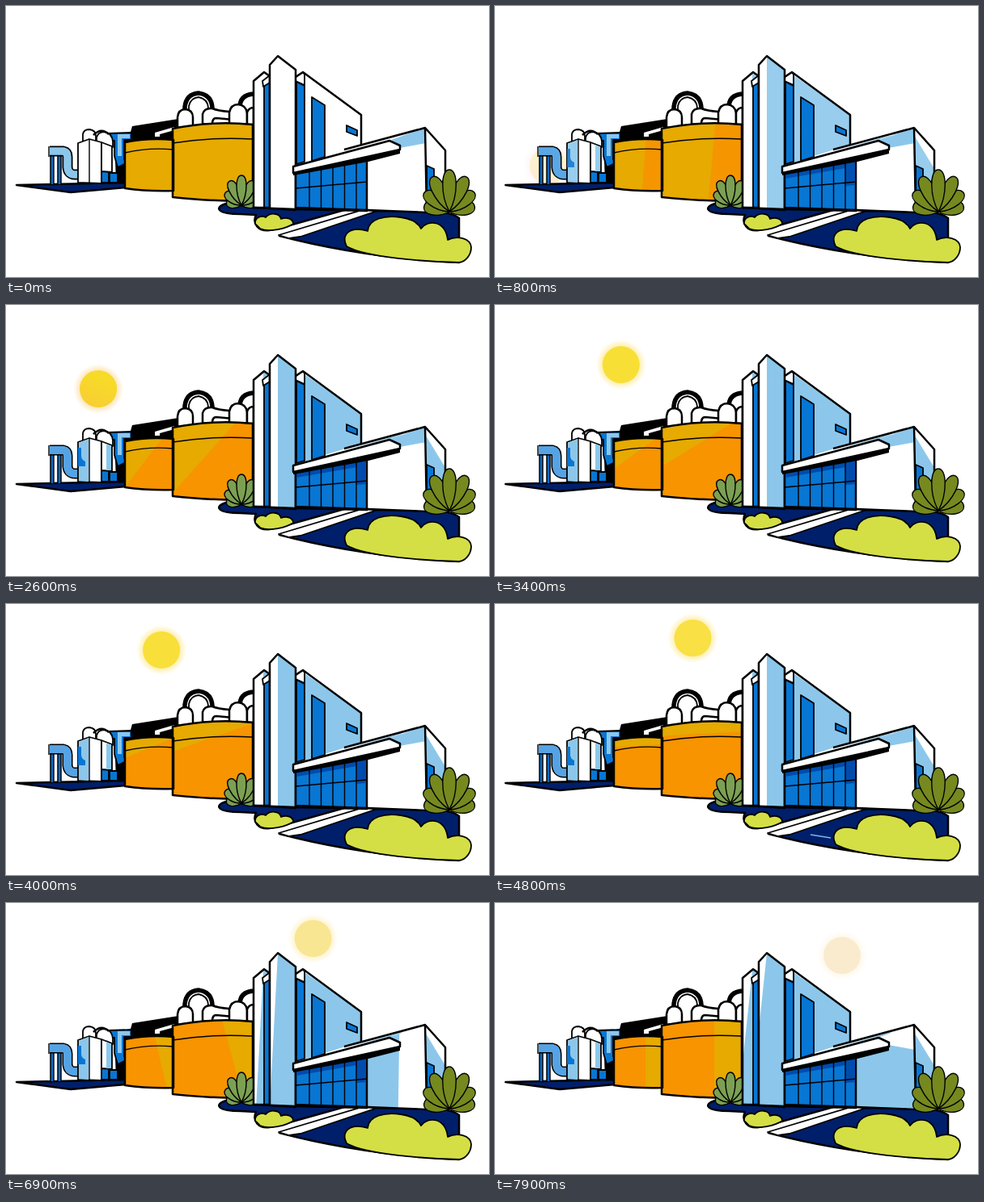
Recreate the animation shown at these times as an HTML page. Size 597x336 px, loop 8000 ms.

```html
<!DOCTYPE html>
<html lang="en">
<head>
<meta charset="utf-8">
<title>Plant by day</title>
<style>
html, body { margin: 0; width: 100%; height: 100%; overflow: hidden; background: #fff; }
svg { display: block; width: 597px; height: 336px; }
.ink, .thin, .line { stroke: #000; stroke-linejoin: round; }
.ink { stroke-width: 2.5; }
.thin { stroke-width: 1.8; }
.line { stroke-width: 1.4; fill: none; }
.open { fill: none; }
.white { fill: #fff; }
.navy { fill: #001f6b; }
.blue { fill: #0876d3; }
.deep { fill: #004cae; }
.sky { fill: #8cc7eb; }
.gold { fill: #e6aa00; }
.orange { fill: #f79400; }
.lime { fill: #d4df45; }
</style>
</head>
<body>
<svg viewBox="0 0 597 336">
  <defs>
    <radialGradient id="halo">
      <stop offset=".7" stop-color="currentColor" stop-opacity=".75"/>
      <stop offset="1" stop-color="currentColor" stop-opacity="0"/>
    </radialGradient>
    <linearGradient id="dawn" x1=".7" y1="0" x2=".3" y2="1">
      <stop offset=".2" stop-color="#f5cf00"/>
      <stop offset="1" stop-color="#f7a030"/>
    </linearGradient>
    <path id="bigTank" d="M206 152Q255 142 305 147V242Q250 242 206 237Z"/>
    <path id="smallTank" d="M147 169Q176 163 207 166V229Q175 230 147 226Z"/>
    <path id="slab" d="M326 251V73L336 62L358 79V253Z"/>
    <path id="wing" d="M306 250V93L319 82L326 87V250Z"/>
    <path id="wall" d="M447 190L487 180V173L476 166L518 151L520 256L447 253Z"/>
    <path id="duct" d="M54 180H71Q76 181 76 187V200Q77 209 85 209H92"/>
    <path id="legs" d="M57 186V221M66 186V221"/>
    <rect id="half" x="-400" y="-400" width="800" height="400"/>
    <clipPath id="inBig"><use href="#bigTank"/></clipPath>
    <clipPath id="inSmall"><use href="#smallTank"/></clipPath>
    <clipPath id="inSlab"><use href="#slab"/></clipPath>
    <clipPath id="inWing"><use href="#wing"/></clipPath>
    <clipPath id="inWall"><use href="#wall"/></clipPath>
  </defs>

  <g id="sun">
    <circle r="31" fill="url(#halo)"/>
    <circle id="disc" r="23"/>
    <circle id="blush" r="23" fill="url(#dawn)"/>
  </g>

  <!-- pipework yard -->
  <path class="navy ink" d="M13 222L148 219V225L80 231Z"/>
  <path d="M156 149L213 140V166L150 170ZM134 160L157 156L148 220H136Z"/>
  <path class="white" d="M184 162V157L208 150V154L190 159V162Z"/>
  <path class="blue thin" d="M117 205H127V219H117ZM128 207H138V219H128ZM126 158L155 157V166H146V190L150 194L138 200L134 186V167H126Z"/>
  <path class="sky" d="M138 159H153V164H143V186H138Z"/>
  <g fill="none">
    <use href="#legs" stroke="#000" stroke-width="5.5"/>
    <use href="#legs" stroke="#0b6bc5" stroke-width="2.6"/>
    <use href="#duct" stroke="#000" stroke-width="13"/>
    <use href="#duct" stroke="#8cc7eb" stroke-width="9.5"/>
    <use href="#duct" class="day" stroke="#55a3e4" stroke-width="9.5"/>
  </g>
  <path class="line" d="M53 174V187"/>
  <path class="white thin" d="M95 168V159Q96 153 103 153Q111 154 111 161V168ZM112 168V163Q114 156 121 156Q131 157 132 168V175H112Z"/>
  <path class="open ink" d="M108 160Q118 150 127 159"/>
  <path class="white thin" d="M89 170L103 165L118 169V220L89 219ZM118 169L131 174V206L118 205Z"/>
  <g class="day">
    <path class="sky" d="M90 171L102 166V219L90 218ZM124 172L130 175V205H124Z"/>
    <path class="blue" d="M89 177H93V187Q93 192 98 194V200H89Z"/>
  </g>
  <path class="line" d="M103 166V219M118 170V219"/>

  <!-- domes and arches over the tanks -->
  <path class="white" stroke="#000" stroke-width="5.5" d="M221 134V125Q223 109 238 108Q254 110 255 126V138M289 126Q289 110 306 109"/>
  <path class="white thin" d="M226 150V124Q228 114 238 113Q249 115 250 126V146"/>
  <g class="white ink">
    <path d="M212 151V138Q213 128 222 128Q231 129 231 138V149Z"/>
    <path d="M243 147V134Q245 126 255 127Q262 130 276 131L282 133V141L260 139Q255 139 255 146Z"/>
    <path d="M276 146V132Q278 122 287 122Q297 123 298 133V147Z"/>
    <path d="M298 147V132Q300 126 306 126V147Z"/>
  </g>

  <g class="gold"><use href="#smallTank"/><use href="#bigTank"/></g>
  <g class="day">
    <g class="orange"><use href="#smallTank"/><use href="#bigTank"/></g>
    <g clip-path="url(#inBig)"><use id="tankLight" href="#half" class="gold"/></g>
    <g clip-path="url(#inSmall)"><use href="#tankLight" transform="translate(23.4 62.8) scale(.6 .7)"/></g>
  </g>
  <g class="open ink"><use href="#smallTank"/><use href="#bigTank"/></g>
  <path class="line" d="M147 182Q176 175 207 178M206 170Q255 162 305 165"/>

  <!-- grounds -->
  <path class="navy ink" d="M272 245C256 250 262 258 290 258L309 259C304 270 312 280 326 278L354 271L418 253L306 249Z"/>
  <path class="navy ink" d="M338 285L458 254L530 255Q552 256 560 263V318Q440 312 338 285Z"/>
  <path id="glint" d="M390 286L415 290" stroke="#7db8ee" stroke-width="1.6"/>
  <path class="white thin" d="M337 284L440 253L459 254L364 286L350 288Z"/>
  <g id="leftBush" fill="#7ca052" transform="translate(291 247)"></g>

  <!-- tower -->
  <use href="#wing" class="white"/>
  <g class="day" clip-path="url(#inWing)"><use id="wingLight" href="#half" class="sky"/></g>
  <path class="blue thin" d="M319 98L326 94V250H319Z"/>
  <path class="white thin" d="M317 93L326 86V95L318 100Z"/>
  <use href="#wing" class="open ink"/>

  <path class="white" d="M358 88L367 82L439 135V172L358 196Z"/>
  <path class="sky day" d="M369 86L439 135V172L368 194Z"/>
  <path class="blue thin" d="M359 94L369 99V193L359 196Z"/>
  <path class="white thin" d="M358 88L367 82L369 85V98L358 93Z"/>
  <path class="blue thin" d="M378 113L394 123V187L378 192ZM421 148L434 154V161L421 156Z"/>
  <path class="open ink" d="M358 88L367 82L439 135V172"/>

  <use href="#slab" class="white"/>
  <g class="day" clip-path="url(#inSlab)"><use id="slabLight" href="#half" class="sky"/></g>
  <use href="#slab" class="open ink"/>

  <!-- entrance -->
  <path class="white" d="M418 179L518 151L476 170Z"/>
  <path class="sky day" d="M430 177L490 160L480 169L474 167Z"/>
  <use href="#wall" class="white"/>
  <g clip-path="url(#inWall)"><use id="wallLight" href="#half" class="sky"/></g>
  <path class="white" d="M518 151L543 179V212L520 256Z"/>
  <path class="sky day" d="M519 162L542 200V212L520 254Z"/>
  <path class="blue thin" d="M520 198L529 202V232L520 236Z"/>
  <path class="open ink" d="M418 178L518 151L543 179V212L520 256L447 253M518 151L520 256"/>
  <path class="blue ink" d="M358 205L446 190V253L358 250Z"/>
  <path class="deep day" d="M359 206L445 191V199L359 214ZM433 194H445V222L433 223Z"/>
  <path id="mullions" class="line"/>
  <path d="M355 203L487 176V183L448 193L355 210Z"/>
  <path class="white ink" d="M355 199L474 167L487 173V178L355 207Z"/>
  <path class="ink" d="M306 250L358 252L447 254"/>

  <g id="rightBush" fill="#76891f" transform="translate(548 255)"></g>
  <path class="lime thin" d="M308 270C307 262 316 259 321 262C326 256 338 256 340 264C347 261 355 264 355 270C347 276 325 281 314 276Z"/>
  <path class="lime thin" d="M421 298C414 284 424 272 447 279C448 264 468 259 488 262C503 264 510 270 513 276C522 264 543 266 546 290C558 284 574 288 575 299C575 309 568 317 560 318C520 317 445 312 421 298Z"/>
</svg>
<script>
const LOOP = 8000;
const $ = id => document.getElementById(id);
const ramp = (t, from, to) => Math.min(1, Math.max(0, (t - from) / (to - from)));
const mix = (a, b, k) => a.map((v, i) => v + (b[i] - v) * k);
const rgb = c => `rgb(${c.map(Math.round)})`;

// Keys are [time, value] pairs, linear in between.
const along = (keys, t) => keys.slice(1).reduce(
  (v, [time, value], i) => v + (value - keys[i][1]) * ramp(t, keys[i][0], time), keys[0][1]);

// Each lit or shaded area is a half-plane turning about a fixed corner.
const lights = {
  tankLight: { pivot: [271, 160], turn: [[900, -85], [1800, -65], [4800, -3], [5900, 24], [6900, 75], [7900, 90]] },
  wallLight: { pivot: [486, 176], turn: [[5300, -10], [6900, -89], [7900, -170]] },
  slabLight: { pivot: [336, 62], turn: [[5900, 90], [7900, 96]] },
  wingLight: { pivot: [318, 84], turn: [[5900, 90], [7900, 96]] }
};

// The sun follows one cubic Bezier curve.
const arc = [[66, 198], [83, 41], [333, 1], [429, 65]];
function sunAt(u) {
  const v = 1 - u;
  const weights = [v * v * v, 3 * v * v * u, 3 * v * u * u, u * u * u];
  return [0, 1].map(axis => arc.reduce((sum, p, i) => sum + p[axis] * weights[i], 0));
}

// A fan of petals, longest in the middle, drawn from the sides inwards.
function fan(id, side, extra, width) {
  let petals = "";
  for (const angle of [78, 52, 26, 0]) {
    const size = side + extra * Math.cos(angle * Math.PI / 180) ** 2;
    const d = `M0 0C${-width} ${-size * .4} ${-width} ${-size} 0 ${-size}S${width} ${-size * .4} 0 0`;
    for (const a of new Set([-angle, angle]))
      petals += `<path class="line" style="fill:inherit" d="${d}" transform="rotate(${a})"/>`;
  }
  $(id).innerHTML = petals;
}
fan("rightBush", 31, 21, 11);
fan("leftBush", 18, 19, 8);

let bars = "M358 226L446 218";
for (let x = 375; x < 440; x += 14.5) bars += `M${x} ${205 - (x - 358) / 6}V252`;
$("mullions").setAttribute("d", bars);

const days = document.querySelectorAll(".day");

function draw(t) {
  days.forEach(e => e.style.opacity = ramp(t, 0, 900));
  for (const [id, { pivot, turn }] of Object.entries(lights))
    $(id).setAttribute("transform", `translate(${pivot}) rotate(${along(turn, t)})`);

  const pale = ramp(t, 3400, 7900) ** 2;
  const risen = ramp(t, 1800, 2900);
  $("sun").setAttribute("transform", `translate(${sunAt(ramp(t, 900, 7900))})`);
  $("sun").style.opacity = ramp(t, 700, 1200);
  $("disc").setAttribute("fill", rgb(mix([248, 223, 54], [250, 235, 207], pale)));
  $("halo").style.color = rgb(mix(mix([250, 185, 205], [255, 232, 135], risen), [255, 246, 226], pale));
  $("blush").style.opacity = 1 - risen;
  $("glint").style.opacity = ramp(t, 4200, 4700) - ramp(t, 4900, 5400);
}

const start = performance.now();
function tick() {
  draw((performance.now() - start) % LOOP);
  requestAnimationFrame(tick);
}
draw(0);
requestAnimationFrame(tick);
</script>
</body>
</html>
```
